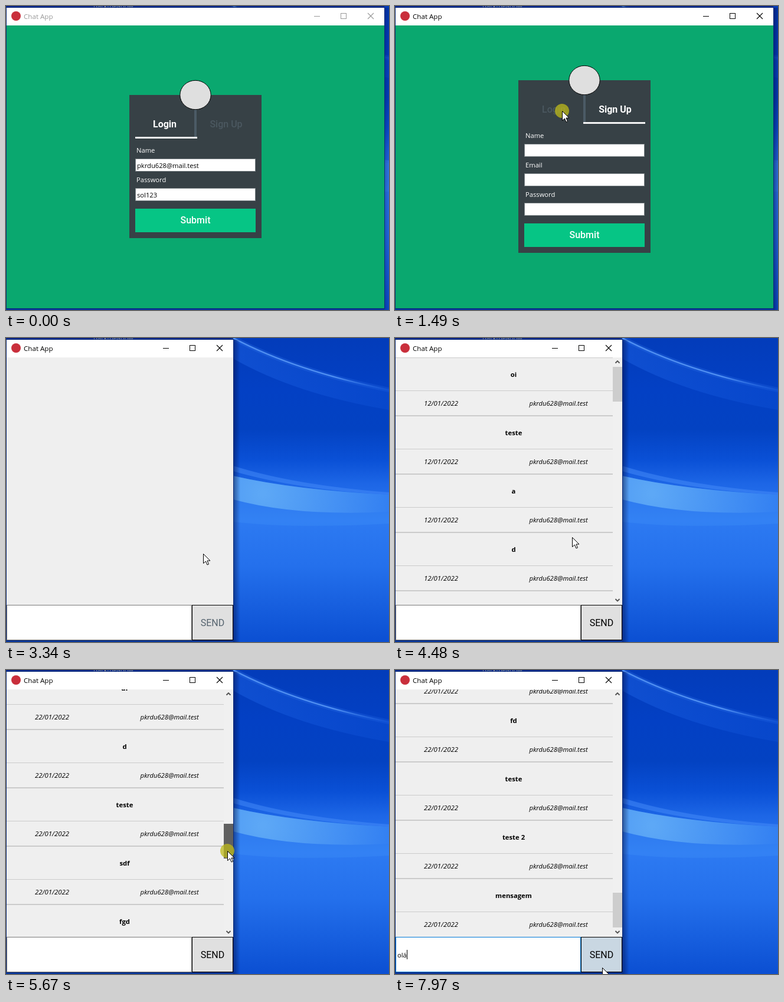
These frames come from a looping animation (649 px wide and 516 px high, 8000 ms). An HTML page with a canvas:

```html
<!DOCTYPE html>
<html lang="en">
<head>
<meta charset="utf-8">
<title>Chat App</title>
<style>
  html, body { margin: 0; width: 100%; height: 100%; overflow: hidden; background: #0540c0; }
  canvas { display: block; }
</style>
</head>
<body>
<canvas id="stage" width="649" height="516"></canvas>
<script>
const ctx = document.getElementById('stage').getContext('2d');
const W = 649, H = 516, LOOP = 8000, STEP = 68;
const UI = '"Open Sans", "Noto Sans", sans-serif';
const FORM = 'Roboto, Inter, sans-serif';
const EMAIL = 'pkrdu628@mail.test';

const AT = { active: 130, signUp: 1080, login: 1620, disabled: 2740, chat: 3340,
             loaded: 4480, focus: 6630 };
const KEYS = [[7690, 'olá'], [7160, 'ol'], [6960, 'o']];
const PRESSES = [[940, 1080], [1490, 1620], [2380, 2520], [4970, 6020], [6490, 6630]];

// Pointer moves: start, end, target x, target y
const MOVES = [
  [130, 130, 636, 492], [200, 400, 560, 385], [470, 600, 500, 290], [670, 870, 385, 205],
  [940, 940, 372, 190], [1200, 1420, 290, 179], [1490, 1490, 283, 178],
  [1690, 1690, 289, 207], [1760, 2180, 334, 366],
  [3670, 3740, 334, 367], [3940, 4280, 288, 378], [4480, 4900, 375, 95],
  [5190, 5190, 376, 112], [5260, 5260, 377, 132], [5330, 5950, 373, 424],
  [6020, 6220, 285, 458], [6290, 6290, 279, 476], [6360, 6490, 269, 483],
  [7760, 7970, 351, 505]
];

// Message list and scroll bar geometry
const ROW = 99, ROWS = 28, LIST_TOP = 33, LIST_END = 453;
const MAX_SCROLL = ROW * ROWS - (LIST_END - LIST_TOP);
const THUMB = { top: 49, end: 378, size: 59, grip: 46 };
const FIRST = ['oi', 'teste', 'a', 'd', 'null', 'fff', 'dfg'];
const LAST = ['fd', 'teste', 'teste 2', 'mensagem'];
const FILLER = ['df', 'teste', 'fgd', 'd', 'sdf'];

const clamp = (v, lo, hi) => Math.min(hi, Math.max(lo, v));

function rect(x, y, w, h, fill, stroke) {
  ctx.fillStyle = fill;
  ctx.fillRect(x, y, w, h);
  if (stroke) {
    ctx.strokeStyle = stroke;
    ctx.lineWidth = 1;
    ctx.strokeRect(x + .5, y + .5, w - 1, h - 1);
  }
}

function text(str, x, y, font, color, align = 'left') {
  ctx.font = font;
  ctx.fillStyle = color;
  ctx.textAlign = align;
  ctx.fillText(str, x, y);
}

function line(color, width, ...pts) {
  ctx.strokeStyle = color;
  ctx.lineWidth = width;
  ctx.beginPath();
  pts.forEach(([x, y]) => ctx.lineTo(x, y));
  ctx.stroke();
}

function disc(x, y, r, fill) {
  ctx.fillStyle = fill;
  ctx.beginPath();
  ctx.arc(x, y, r, 0, Math.PI * 2);
  ctx.fill();
}

function gradient(x0, y0, x1, y1, ...stops) {
  const g = ctx.createLinearGradient(x0, y0, x1, y1);
  stops.forEach(([p, c]) => g.addColorStop(p, c));
  return g;
}

function pointer(t) {
  let x = 0, y = 0;
  for (const [t0, t1, tx, ty] of MOVES) {
    if (t < t0) break;
    const n = Math.round((t1 - t0) / STEP) + 1;
    const u = t >= t1 ? 1 : Math.min(1, (Math.floor((t - t0) / STEP) + 1) / n);
    x += (tx - x) * u;
    y += (ty - y) * u;
  }
  return { x: Math.round(x), y: Math.round(y), shown: t >= MOVES[0][0],
           down: PRESSES.some(([a, b]) => t >= a && t < b) };
}

// Area between two shallow arcs that run to the right edge
function band(top, bottom, fill) {
  ctx.beginPath();
  ctx.moveTo(385, top[0]);
  ctx.quadraticCurveTo(490, top[1], W, top[2]);
  ctx.lineTo(W, bottom[2]);
  ctx.quadraticCurveTo(490, bottom[1], 385, bottom[0]);
  ctx.fillStyle = fill;
  ctx.fill();
}

function desktop() {
  rect(0, 0, W, H, gradient(0, 0, 0, H, [0, '#033cba'], [.17, '#0340c4'], [.3, '#0342c2'],
    [.4, '#0a50d6'], [.48, '#1d66e6'], [.6, '#2d7af2'], [.75, '#2470ec'], [1, '#0b4fd2']));
  band([0, 60, 88], [35, 95, 122], gradient(385, 0, W, 0, [0, 'rgba(30,100,230,.45)'], [1, 'rgba(20,90,225,.25)']));
  ctx.lineCap = 'round';
  for (const [w, c] of [[8, 'rgba(50,120,240,.25)'], [2.5, 'rgba(100,165,255,.75)']]) {
    ctx.strokeStyle = gradient(385, 0, W, 0, [0, c], [.65, c], [1, 'rgba(40,110,235,.2)']);
    ctx.lineWidth = w;
    ctx.beginPath();
    ctx.moveTo(385, 0);
    ctx.quadraticCurveTo(490, 56, W, 88);
    ctx.stroke();
  }
  ctx.lineCap = 'butt';
  band([217, 250, 262], [226, 257, 266], 'rgba(70,140,250,.5)');
  band([234, 258, 266], [312, 324, 315], 'rgba(60,140,245,.4)');
  const glow = ctx.createRadialGradient(435, 264, 4, 435, 264, 215);
  glow.addColorStop(0, '#5da8f6');
  glow.addColorStop(.45, '#4a96f4');
  glow.addColorStop(1, '#3380f2');
  band([234, 258, 266], [274, 303, 295], glow);
  text('darkmeadow', 182, 4, '11px ' + UI, '#f4f0dc', 'center');
}

function appWindow(right, active) {
  rect(right, 3, 12, H, gradient(right, 0, right + 12, 0,
    [0, active ? 'rgba(0,10,60,.5)' : 'rgba(0,10,60,.3)'], [1, 'rgba(0,10,60,0)']));
  rect(0, 0, right, 3, 'rgba(0,8,50,.35)');
  rect(0, 513, right, 3, 'rgba(0,8,50,.35)');
  rect(0, 2, right + 1, 512, '#0d2c78');
  rect(1, 3, right - 1, 30, '#fff');
  disc(17, 17, 8, '#c92f3c');
  const ink = active ? '#000' : '#999';
  text('Chat App', 30, 22, '11.6px ' + UI, ink);
  const b = right - 114;
  line(ink, 1, [b - 5, 17.5], [b + 5, 17.5]);
  ctx.strokeRect(b + 40.5, 12.5, 9, 9);
  line(ink, 1.1, [b + 86, 12], [b + 96, 22]);
  line(ink, 1.1, [b + 96, 12], [b + 86, 22]);
}

function formFields(signUp) {
  return signUp
    ? [['Name', '', 234], ['Email', '', 284], ['Password', '', 334]]
    : [['Name', EMAIL, 259], ['Password', 'sol123', 309]];
}

function loginScreen(t) {
  const signUp = t >= AT.signUp && t < AT.login;
  const top = signUp ? 126 : 151;
  const button = signUp ? 369 : 344;
  const on = '#fff', off = '#4b5860';
  appWindow(641, t >= AT.active);
  rect(1, 33, 640, 480, '#0aa86f');
  rect(209, top, 224, button + 50 - top, '#374146');

  rect(319, top + 20, 4, 52, '#4b5b66');
  rect(signUp ? 319 : 219, top + 71, 105, 3, '#f4f4f4');
  ctx.beginPath();
  ctx.ellipse(321, top, 26.2, 24.7, 0, 0, Math.PI * 2);
  ctx.fillStyle = '#dfdfdf';
  ctx.fill();
  ctx.strokeStyle = '#000';
  ctx.lineWidth = 1;
  ctx.stroke();
  const tab = (str, x, lit) =>
    text(str, x, top + 55, (lit ? 'bold' : '500') + ' 16px ' + FORM, lit ? on : off, 'center');
  tab('Login', 269, !signUp);
  tab('Sign Up', 373, signUp);

  const fields = formFields(signUp);
  fields.forEach(([label, , y]) => text(label, 221, y - 10, '11.2px ' + UI, on));
  ctx.globalAlpha = t >= AT.disabled ? .6 : 1;
  fields.forEach(([, value, y]) => {
    rect(219, y, 204, 22, '#fff', '#7a8286');
    text(value, 222, y + 16, '11.2px ' + UI, '#000');
  });
  rect(219, button, 204, 40, '#06c585');
  text('Submit', 321, button + 25, '500 16px ' + FORM, on, 'center');
  ctx.globalAlpha = 1;
}

function message(i) {
  const tail = ROWS - LAST.length;
  const str = FIRST[i] || (i >= tail ? LAST[i - tail] : FILLER[i * 3 % FILLER.length]);
  const day = i < 5 ? '12' : i < 6 ? '16' : '22';
  return [str, day + '/01/2022'];
}

function messageList(p, t) {
  const dragging = p.down && t < AT.focus - 200;
  const released = t >= PRESSES[3][1];
  const thumb = released ? THUMB.end
    : dragging ? clamp(p.y - THUMB.grip, THUMB.top, THUMB.end) : THUMB.top;
  const scroll = Math.round((thumb - THUMB.top) / (THUMB.end - THUMB.top) * MAX_SCROLL);

  ctx.save();
  ctx.beginPath();
  ctx.rect(1, LIST_TOP, 384, LIST_END - LIST_TOP);
  ctx.clip();
  for (let i = 0; i < ROWS; i++) {
    const y = LIST_TOP - scroll + i * ROW;
    if (y < LIST_TOP - ROW || y > LIST_END) continue;
    const [str, date] = message(i);
    rect(1, y - 1, 368, 2, '#cbcbcb');
    text(str, 201, y + 33, 'bold 11.3px ' + UI, '#000', 'center');
    rect(1, y + 56, 368, 1, '#cbcbcb');
    text(date, 78, y + 82, 'italic 11.4px ' + UI, '#000', 'center');
    text(EMAIL, 277, y + 82, 'italic 11.2px ' + UI, '#000', 'center');
  }
  rect(369, LIST_TOP, 16, 420, '#f0f0f0');
  rect(369, thumb, 16, THUMB.size, dragging ? '#606060' : '#cdcdcd');
  line('#505050', 1.8, [373.5, 42.5], [377, 39], [380.5, 42.5]);
  line('#505050', 1.8, [373.5, 443], [377, 446.5], [380.5, 443]);
  ctx.restore();
}

function chatScreen(p, t) {
  const loaded = t >= AT.loaded, focus = t >= AT.focus;
  appWindow(385, true);
  rect(1, 33, 384, 420, '#efefef');
  if (loaded) messageList(p, t);

  rect(1, 453, 314, 60, '#fff', focus ? '#0078d7' : '#7a7a7a');
  const typed = (KEYS.find(([at]) => t >= at) || [0, ''])[1];
  text(typed, 4, 488, '11.2px ' + UI, '#000');
  if (focus) rect(4 + Math.round(ctx.measureText(typed).width), 475, 1, 16, '#000');

  const hover = p.x >= 315 && p.y >= 453;
  rect(315, 453, 70, 60, hover ? '#c9d7e2' : '#e0e0e0', '#000');
  text('SEND', 350, 489, '16px ' + FORM, loaded ? '#000' : '#56646f', 'center');
}

function overField(p, t) {
  if (t >= AT.chat) return p.x < 315 && p.y > 453;
  return formFields(t >= AT.signUp && t < AT.login)
    .some(([, , y]) => p.x > 219 && p.x < 423 && p.y > y && p.y < y + 22);
}

function drawPointer(p, t) {
  if (!p.shown) return;
  if (p.down) disc(p.x, p.y, 12, 'rgba(190,185,25,.75)');
  ctx.save();
  ctx.translate(p.x + .5, p.y + .5);
  if (overField(p, t)) {
    line('#000', 1, [0, -7], [0, 7]);
    line('#000', 1, [-3.5, -8], [3.5, -8]);
    line('#000', 1, [-3.5, 7], [3.5, 7]);
  } else {
    ctx.beginPath();
    [[0, 0], [0, 16], [4, 12.5], [6.5, 18.5], [9, 17.5], [6.5, 11.5], [11.5, 11.5]]
      .forEach(([x, y]) => ctx.lineTo(x, y));
    ctx.closePath();
    ctx.fillStyle = '#fff';
    ctx.fill();
    ctx.strokeStyle = '#000';
    ctx.lineWidth = 1;
    ctx.stroke();
  }
  ctx.restore();
}

function draw(t) {
  const p = pointer(t);
  desktop();
  if (t < AT.chat) loginScreen(t);
  else chatScreen(p, t);
  drawPointer(p, t);
}

const start = performance.now();
function tick() {
  draw((performance.now() - start) % LOOP);
  requestAnimationFrame(tick);
}
tick();
</script>
</body>
</html>
```
